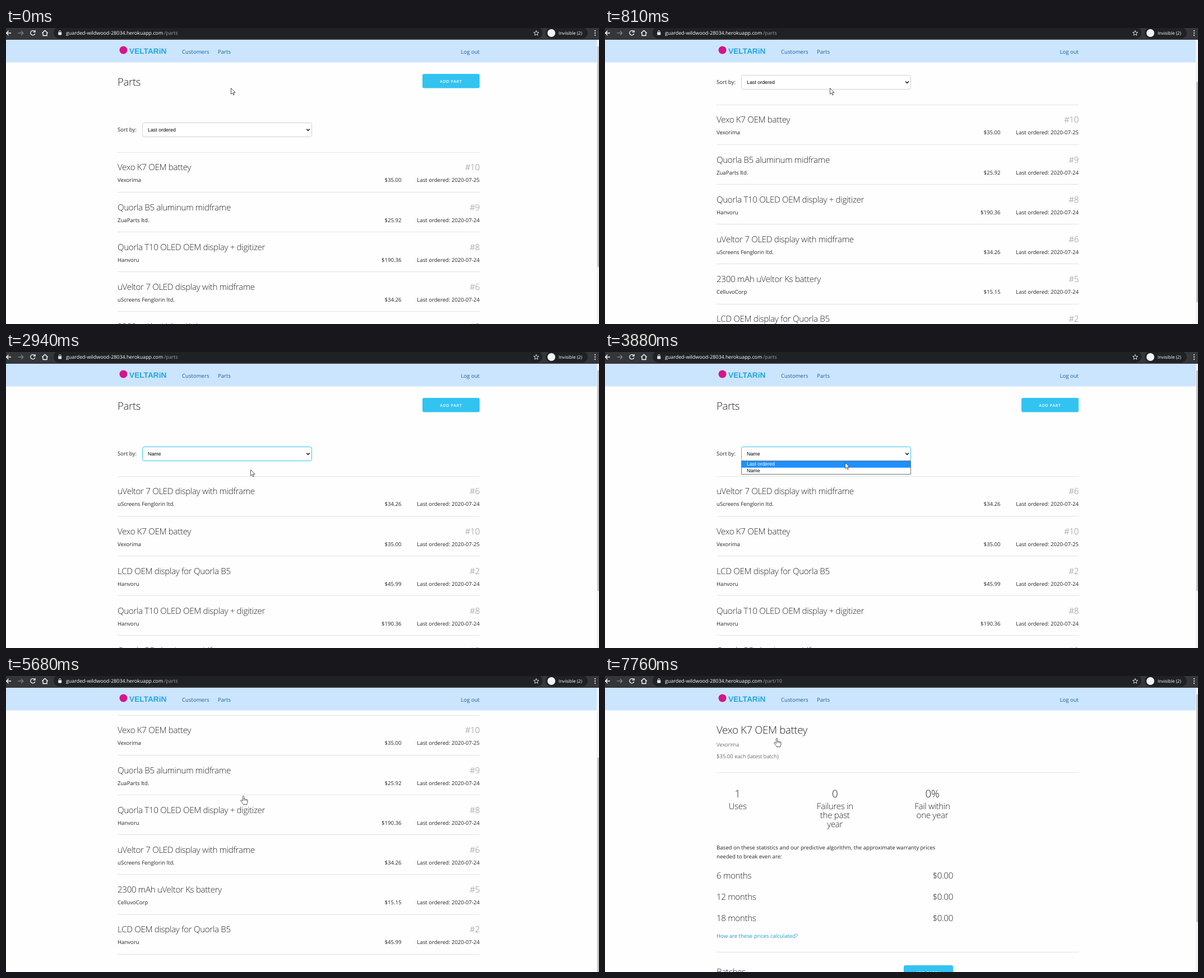
An HTML page with a canvas that plays this animation: 1058 by 529 pixels, repeating every 8000 ms.

```html
<!DOCTYPE html>
<html lang="en">
<head>
<meta charset="utf-8">
<title>Parts</title>
<style>
  html, body { margin: 0; width: 100%; height: 100%; overflow: hidden; background: #fefefe; }
  canvas { display: block; }
</style>
</head>
<body>
<canvas id="stage" width="1058" height="529"></canvas>
<script>
const ctx = document.getElementById('stage').getContext('2d');
const LOOP = 8000;
const UI = '"Open Sans", "Noto Sans", sans-serif';
const ARIAL = '"Liberation Sans", sans-serif';
const LEFT = 199, RIGHT = 845, PITCH = 71.2;
const INK = '#262626', NAV = '#1d5f96', SKY = '#33c3f0';

// text styles: [font, letter spacing]
const BODY = [`400 9.6px ${UI}`, 0];
const THIN = [`300 9.6px ${UI}`, 0];
const TITLE = [`300 15.2px ${UI}`, -0.35];
const HEAD = [`300 18.6px ${UI}`, -0.35];
const BUTTON = [`600 7px ${UI}`, 0.7];
const FIELD = [`400 8.9px ${ARIAL}`, 0];
const URL_TEXT = [`400 8.9px ${UI}`, 0];
const CHIP = [`400 8px ${UI}`, 0];
const BRAND = [`700 13.7px ${ARIAL}`, 0];

const parts = {
  10: ['Vexo K7 OEM battey', 'Vexorima', '$35.00', '25'],
  9: ['Quorla B5 aluminum midframe', 'ZuaParts ltd.', '$25.92', '24'],
  8: ['Quorla T10 OLED OEM display + digitizer', 'Hanvoru', '$190.36', '24'],
  6: ['uVeltor 7 OLED display with midframe', 'uScreens Fenglorin ltd.', '$34.26', '24'],
  5: ['2300 mAh uVeltor Ks battery', 'CelluvoCorp', '$15.15', '24'],
  2: ['LCD OEM display for Quorla B5', 'Hanvoru', '$45.99', '24']
};
const byDate = [10, 9, 8, 6, 5, 2];
const byName = [6, 10, 2, 8, 9, 5];

// stepped tracks: [start time, ...values]
const scrollTrack = [[0, 0], [270, 15], [440, 115], [560, 152], [690, 140], [810, 85], [930, 0],
  [5000, 12], [5150, 105], [5270, 152]];
const mouseTrack = [[0, 401, 107], [1180, 409, 130], [1300, 430, 172], [1420, 438, 193], [1570, 437, 191],
  [2000, 437, 198], [2120, 436, 205], [2240, 436, 207], [2400, 436, 210], [3070, 436, 200],
  [3190, 434, 187], [3330, 431, 181], [3450, 429, 177], [3750, 429, 187], [3880, 428, 197],
  [4160, 426, 200], [4280, 425, 202], [4570, 424, 208], [4700, 422, 214], [5680, 423, 214],
  [5800, 345, 135], [5950, 309, 98], [6100, 303, 105], [6800, 306, 105], [7760, 306, 111]];
// highlighted option while the menu is open, -1 when closed
const menuTrack = [[0, -1], [1570, 0], [2240, 1], [2550, -1], [3600, 1], [3880, 0], [4420, -1]];

function at(track, t) {
  let hit = track[0];
  for (const key of track) if (key[0] <= t) hit = key;
  return hit.slice(1);
}

const within = (t, from, to) => t >= from && t < to;

function box(x, y, w, h, color) {
  ctx.fillStyle = color;
  ctx.fillRect(x, y, w, h);
}

function roundBox(x, y, w, h, r, fill, stroke) {
  ctx.beginPath();
  ctx.roundRect(x, y, w, h, r);
  if (fill) { ctx.fillStyle = fill; ctx.fill(); }
  if (stroke) { ctx.strokeStyle = stroke; ctx.lineWidth = 1; ctx.stroke(); }
}

function disc(x, y, r, color) {
  ctx.fillStyle = color;
  ctx.beginPath();
  ctx.arc(x, y, r, 0, 7);
  ctx.fill();
}

function text(str, x, y, [font, spacing], color = INK, align = 'left') {
  ctx.font = font;
  ctx.letterSpacing = spacing + 'px';
  ctx.textRendering = 'geometricPrecision';
  ctx.textAlign = align;
  ctx.fillStyle = color;
  ctx.fillText(str, x, Math.round(y));
}

function line(d, color, width = 1.3) {
  ctx.strokeStyle = color;
  ctx.lineWidth = width;
  ctx.stroke(new Path2D(d));
}

const rule = y => box(LEFT, Math.round(y), RIGHT - LEFT, 1, '#e3e3e3');

function button(label, x, y, w) {
  roundBox(x, y, w, 25.5, 3, SKY);
  text(label, x + w / 2, y + 16, BUTTON, '#fff', 'center');
}

function drawBrowser(t) {
  box(0, 0, 1058, 21, '#35363a');
  roundBox(85, -2, 872, 21, 10, '#202124');
  line('M9 9H1M4.5 5 .7 9l3.8 4', '#fff');
  line('M21.5 9h9M27 5l3.8 4-3.8 4', '#7d8084');
  if (within(t, 7050, 7610)) {
    line('M44.2 5.2l7.4 7.4M51.6 5.2l-7.4 7.4', '#fff');
  } else {
    line('M51.2 6.2A4.1 4.1 0 1 0 51.8 10', '#fff');
    line('M52 4v3.4h-3.4', '#fff');
  }
  line('M64.3 9.2 69.5 4.4l5.2 4.8M66 8.5v5h7v-5', '#fff');
  roundBox(93.2, 7.6, 6, 5, 0.8, '#e8eaed');
  line('M94.5 8V6.3a1.7 1.7 0 0 1 3.4 0V8', '#e8eaed', 1);
  text('guarded-wildwood-28034.herokuapp.com', 107, 12, URL_TEXT, '#fff');
  text(t < 7330 ? '/parts' : '/part/10', 282, 12, URL_TEXT, '#9aa0a6');

  ctx.beginPath();
  for (let i = 0; i < 10; i++) {
    const r = i % 2 ? 2.1 : 4.8, a = i * Math.PI / 5 - Math.PI / 2;
    ctx.lineTo(946 + r * Math.cos(a), 9.3 + r * Math.sin(a));
  }
  ctx.closePath();
  ctx.strokeStyle = '#dadce0';
  ctx.lineWidth = 1;
  ctx.stroke();

  roundBox(963, -1, 75, 20, 10, '#202124');
  disc(973, 9, 7, '#f1f3f4');
  text('Invisible (2)', 986, 12, CHIP, '#fff');
  for (let y = 5; y < 14; y += 4) disc(1051, y, 1.1, '#fff');
}

function drawHeader(loading) {
  box(0, 21, loading ? 1058 : 1054, 40.5, '#cce5ff');
  ctx.save();
  if (loading) ctx.translate(2, 0);
  disc(209.5, 39.5, 7, '#d6148c');
  text('VELTARiN', 220, 46, BRAND, '#1ea5dc');
  text('Customers', 314, 46, BODY, NAV);
  text('Parts', 378, 46, BODY, NAV);
  text('Log out', RIGHT, 46, BODY, NAV, 'right');
  ctx.restore();
}

function drawScrollbar(top, height) {
  box(1054, 21, 4, 508, '#f1f1f1');
  box(1055, top, 3, height, '#c1c1c1');
}

function drawMenu(active) {
  roundBox(243.5, 194.5, 302, 24, 0, '#fff', '#6f7478');
  ['Last ordered', 'Name'].forEach((label, i) => {
    const on = i === active;
    if (on) box(244, 195 + i * 12, 301, 11.7, '#1e90ff');
    text(label, 253, 203.4 + i * 11.6, FIELD, on ? '#fff' : '#000');
  });
}

function drawList(t, scroll) {
  const named = within(t, 2550, 4570);
  const showRules = !within(t, 930, 2550);
  ctx.save();
  ctx.translate(0, -scroll);
  text('Parts', LEFT, 103, HEAD);
  button('ADD PART', 743, 82, 102);
  text('Sort by:', LEFT, 185, BODY);
  roundBox(243.5, 169.5, 302, 25, 3, '#fff', t < 1570 ? '#d1d1d1' : SKY);
  text(named ? 'Name' : 'Last ordered', 253, 185, FIELD, '#000');
  line('M536.3 180.6l2.7 2.8 2.7-2.8', '#111', 1.5);

  const order = named ? byName : byDate;
  order.forEach((id, i) => {
    const [name, maker, price, day] = parts[id];
    const y = i * PITCH;
    if (showRules) rule(221.6 + y);
    text(name, LEFT, 254.4 + y, TITLE);
    text('#' + id, RIGHT, 254.4 + y, TITLE, '#8c8c8c', 'right');
    text(maker, LEFT, 275.4 + y, BODY);
    text(price, 705.5, 275.4 + y, BODY, INK, 'right');
    text('Last ordered: 2020-07-' + day, RIGHT, 275.4 + y, BODY, INK, 'right');
  });
  if (showRules) rule(221.6 + order.length * PITCH);

  const [active] = at(menuTrack, t);
  if (active >= 0) drawMenu(active);
  ctx.restore();
}

function drawDetail() {
  const [name, maker, price] = parts[10];
  text(name, LEFT, 103, HEAD);
  text(maker, LEFT, 126, THIN);
  text(price + ' each (latest batch)', LEFT, 147, THIN);
  rule(172);

  const stats = [['1', 'Uses'], ['0', 'Failures in', 'the past', 'year'], ['0%', 'Fail within', 'one year']];
  stats.forEach(([value, ...label], i) => {
    const x = 236.5 + i * 173.7;
    text(value, x, 217, HEAD, INK, 'center');
    label.forEach((row, k) => text(row, x, 237.6 + k * 16.4, TITLE, INK, 'center'));
  });

  text('Based on these statistics and our predictive algorithm, the approximate warranty prices', LEFT, 310, BODY);
  text('needed to break even are:', LEFT, 326, BODY);
  [6, 12, 18].forEach((months, i) => {
    const y = 362.4 + i * 37.6;
    text(months + ' months', LEFT, y, TITLE);
    text('$0.00', 621, y, TITLE, INK, 'right');
  });
  text('How are these prices calculated?', LEFT, 468, BODY, '#1e9ecb');
  rule(493);
  text('Batches', LEFT, 534, TITLE);
  button('ADD BATCH', 533, 517, 88);
}

const arrow = new Path2D('M0 0V10.8L2.5 8.5 4.2 12.4 5.9 11.6 4.2 7.9H7.6Z');
const hand = new Path2D('M-1.2 9V1.1a1.2 1.2 0 0 1 2.4 0V5.4q1.2-.9 2.2.3 1.3-.7 2.1.6 1.8-.4 1.9 1.3' +
  'V10.6q0 1.6-1.2 3V15.2H-.4V13.9Q-2.4 12-4.6 8.7q-.5-1.5 1-1.5 1.2.3 2.4 1.8Z');

function drawMouse(t) {
  const [x, y] = at(mouseTrack, t);
  const shape = t < 5680 ? arrow : hand;
  ctx.save();
  ctx.translate(x + 0.5, y + 0.5);
  ctx.lineJoin = 'round';
  ctx.fillStyle = '#fff';
  ctx.fill(shape);
  ctx.strokeStyle = '#2a2a2a';
  ctx.lineWidth = 0.8;
  ctx.stroke(shape);
  if (shape === hand) line('M1.2 5.4V8.4M3.4 5.8V8.6M5.5 6.4V8.8', '#2a2a2a', 0.6);
  ctx.restore();
}

function draw(t) {
  box(0, 0, 1058, 529, '#fefefe');
  const loading = within(t, 7610, 7760);
  if (t < 7610) {
    const [scroll] = at(scrollTrack, t);
    drawList(t, scroll);
    drawScrollbar(33 + scroll * 0.743, 394);
  } else if (!loading) {
    drawDetail();
    drawScrollbar(33, 407);
  }
  drawHeader(loading);
  drawBrowser(t);
  drawMouse(t);
}

const start = performance.now();
function tick() {
  draw((performance.now() - start) % LOOP);
  requestAnimationFrame(tick);
}
tick();
</script>
</body>
</html>
```
